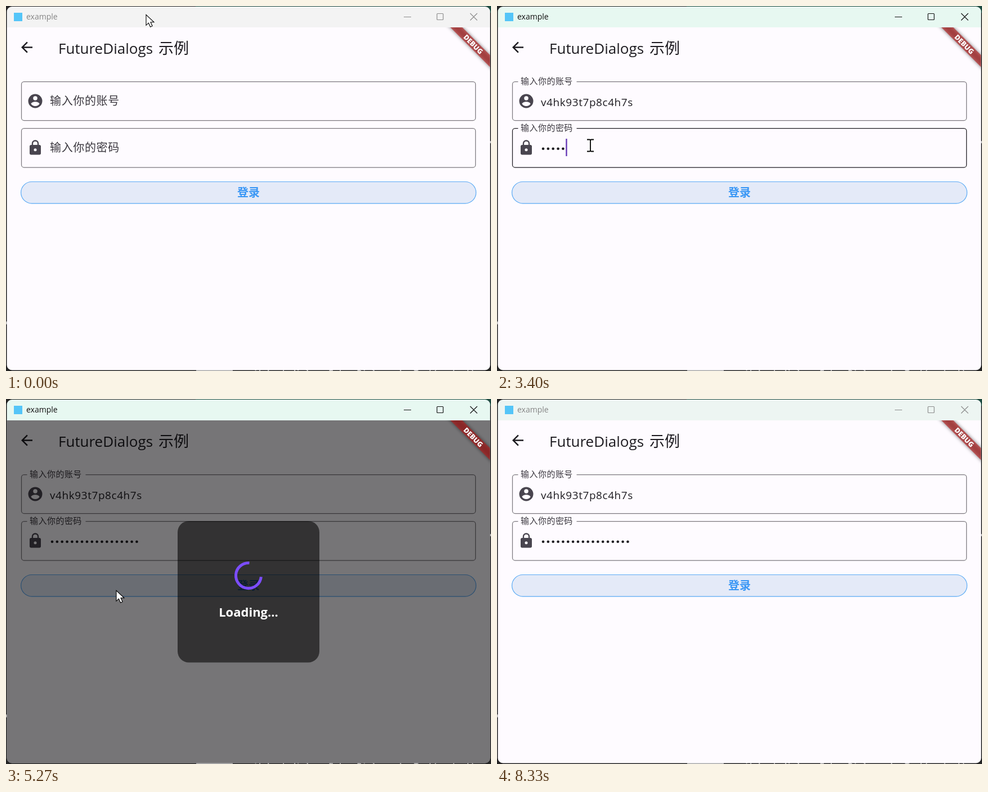
An HTML page that plays this animation: 862 by 649 pixels, repeating every 8400 ms.

```html
<!DOCTYPE html>
<html lang="zh">
<head>
<meta charset="utf-8">
<title>FutureDialogs</title>
<style>
  html, body { margin: 0; width: 100%; height: 100%; overflow: hidden; background: #242424; }
  svg { display: block; width: 862px; height: 649px; }
  text { font-family: "Open Sans", "Noto Sans", "Noto Sans CJK SC", sans-serif; }
  .cjk { font-family: "Noto Sans CJK SC", "Noto Sans CJK", sans-serif; }
  .label { font-size: 20px; font-weight: 300; letter-spacing: .63px; fill: #3b383f; }
  .box { fill: none; stroke-width: 1.25; }
  .mid { text-anchor: middle; }
</style>
</head>
<body>
<svg viewBox="0 0 862 649">
  <defs>
    <clipPath id="win"><rect x="1.5" y="1" width="859" height="646.5" rx="9"/></clipPath>
    <clipPath id="page"><path d="M1.5 38h859v600.5a9 9 0 0 1-9 9h-841a9 9 0 0 1-9-9z"/></clipPath>
    <filter id="soft" x="-20%" y="-100%" width="140%" height="300%"><feGaussianBlur stdDeviation="3"/></filter>
  </defs>

  <rect width="862" height="649" fill="#242424"/>
  <rect x="337" width="525" height="12" fill="#1d4a40"/>
  <rect x="338" y="646" width="65" height="3" fill="#a9a9a9"/>
  <rect y="561" width="3" height="5" fill="#b5b5b5"/>
  <rect x="859" y="240" width="3" height="4" fill="#b5b5b5"/>
  <text x="414" y="657" style="font:700 14px 'Noto Sans Mono',monospace" fill="#bbb">await host.dialog: FutureDialogs.showText(context);</text>

  <g clip-path="url(#win)">
    <rect id="bar" width="862" height="38"/>
    <rect x="14" y="12" width="15" height="15" fill="#54c5f8"/>
    <text id="name" x="36" y="24" font-size="14">example</text>
    <path id="controls" fill="none" stroke-width="1.2"
      d="M707 19.5h13M825 13l12.5 12.5M837.5 13L825 25.5M767 13.5h9q1 0 1 1v9q0 1-1 1h-9q-1 0-1-1v-9q0-1 1-1z"/>

    <rect y="38" width="862" height="611" fill="#fefbff"/>
    <path transform="translate(22 58.5) scale(1.25)" fill="#1d1b20"
      d="M20 11H7.83l5.59-5.59L12 4l-8 8 8 8 1.41-1.41L7.83 13H20z"/>
    <text x="93" y="84.5" font-size="26" fill="#1d1b20">FutureDialogs</text>
    <text x="271" y="85" class="cjk" font-size="27" font-weight="300" fill="#1d1b20">示例</text>

    <g id="user">
      <rect class="box" x="27.5" y="134.5" width="807" height="69" rx="4.5"/>
      <rect class="gap" x="37.5" y="132" height="5" fill="#fefbff"/>
      <text class="cjk label">输入你的账号</text>
    </g>
    <path transform="translate(37 154) scale(1.25)" fill="#49454f"
      d="M12 2a10 10 0 1 0 0 20a10 10 0 1 0 0-20zm0 3a3 3 0 1 1 0 6a3 3 0 1 1 0-6zm0 14.2c-2.5 0-4.71-1.28-6-3.22.03-1.99 4-3.08 6-3.08 1.99 0 5.97 1.09 6 3.08-1.29 1.94-3.5 3.22-6 3.22z"/>
    <text id="typed" x="78" y="177.5" font-size="18.9" letter-spacing=".63" fill="#1d1b20"></text>

    <g id="pass">
      <rect class="box" x="27.5" y="217.5" width="807" height="69.5" rx="4.5"/>
      <rect class="gap" x="37.5" y="215" height="5" fill="#fefbff"/>
      <text class="cjk label">输入你的密码</text>
    </g>
    <path transform="translate(37 237) scale(1.25)" fill="#49454f"
      d="M18 8h-1V6A5 5 0 0 0 7 6v2H6c-1.1 0-2 .9-2 2v10c0 1.1.9 2 2 2h12c1.1 0 2-.9 2-2V10c0-1.1-.9-2-2-2zm-6 9a2 2 0 1 1 0-4a2 2 0 1 1 0 4zm3.1-9H8.9V6a3.1 3.1 0 0 1 6.2 0z"/>
    <g id="dots" fill="#1d1b20"></g>
    <rect id="caret" width="2.4" height="31" fill="#673ab7"/>

    <rect id="shadow" x="27" y="315" width="808" height="39" rx="19.5" filter="url(#soft)"/>
    <rect x="26.6" y="312.5" width="808.8" height="38.6" rx="19.3" fill="#e4eaf8" stroke="#5aaaf5" stroke-width="1.2"/>
    <text x="431" y="339" class="cjk mid" font-size="20" font-weight="700" fill="#3a97f5">登录</text>

    <g id="modal">
      <rect id="barrier" y="38" width="862" height="611"/>
      <g id="loading">
        <rect x="305" y="217" width="252" height="251.5" rx="20" fill-opacity=".57"/>
        <path id="arc" fill="none" stroke="#7c4dff" stroke-width="5"/>
        <text x="431" y="387" class="mid" font-size="22" font-weight="700" fill="#fff">Loading...</text>
      </g>
      <g id="error">
        <rect x="286" y="217" width="290" height="251.5" rx="20" fill-opacity=".57"/>
        <g fill="none" stroke="#f44336" stroke-width="5.5">
          <path class="stroke" pathLength="1" stroke-dasharray="1 2" d="M411 294l40.5 40.5"/>
          <path class="stroke" pathLength="1" stroke-dasharray="1 2" d="M451.5 294L411 334.5"/>
        </g>
        <text x="431" y="401" class="cjk mid" font-size="22.5" font-weight="700" letter-spacing=".3" fill="#fff">账户名或密码错误</text>
      </g>
    </g>

    <g clip-path="url(#page)">
      <g transform="translate(860.5 38) rotate(45)">
        <rect x="-60" y="35" width="120" height="15" fill-opacity=".5" filter="url(#soft)"/>
        <rect x="-60" y="35" width="120" height="15" fill="#b71c1c" fill-opacity=".63"/>
        <text x="0" y="47" class="mid" font-size="12.4" font-weight="800" fill="#fff">DEBUG</text>
      </g>
    </g>
  </g>

  <path id="arrow" fill="#fff" stroke="#000" stroke-width="1.1" d="M.5 .5V19.3l4.4-4.1 3.2 7 3.5-1.6-3.1-6.8h6z"/>
  <g id="beam" fill="none">
    <path stroke="#fff" stroke-width="3.6" d="M-6-10.5h12M0-10.5v21M-6 10.5h12"/>
    <path stroke="#000" stroke-width="1.8" d="M-6-10.5h4.5q1.5 0 1.5 1.5 0-1.5 1.5-1.5h4.5M0-10v20M-6 10.5h4.5q1.5 0 1.5-1.5 0 1.5 1.5 1.5h4.5"/>
  </g>
</svg>

<script>
const LOOP = 8400;
const LOGIN = 'v4hk93t7p8c4h7s';
const $ = id => document.getElementById(id);
const set = (el, attrs) => { for (const k in attrs) el.setAttribute(k, attrs[k]); };
const show = (el, on) => set(el, { visibility: on ? 'visible' : 'hidden' });
const clamp = v => Math.min(1, Math.max(0, v));
const ramp = (t, a, b) => clamp((t - a) / (b - a));
const mix = (a, b, p) => a + (b - a) * p;
const smooth = p => p * p * (3 - 2 * p);
const within = (t, a, b) => t >= a && t < b;

// cubic-bezier(.4, 0, .2, 1)
function standard(x) {
  let lo = 0, hi = 1, s = 0;
  for (let i = 0; i < 18; i++) {
    s = (lo + hi) / 2;
    const bx = 3 * (1 - s) ** 2 * s * .4 + 3 * (1 - s) * s * s * .2 + s ** 3;
    if (bx < x) lo = s; else hi = s;
  }
  return 3 * (1 - s) * s * s + s ** 3;
}

// time, x, y
const PATH = [
  [0, 248.5, 15], [380, 200, 156], [800, 194.5, 166],
  [2410, 194.5, 166], [2670, 168, 245], [2870, 166, 248],
  [4210, 166, 248], [4470, 195.5, 340],
  [6210, 195.5, 340], [6690, 411, 447.5],
  [6890, 411, 447.5], [7070, 401, 453], [7940, 163, 655], [LOOP, 163, 655]
];

function pointer(t) {
  const i = Math.max(1, PATH.findIndex(k => k[0] > t));
  const [t0, x0, y0] = PATH[i - 1], [t1, x1, y1] = PATH[i];
  const p = smooth(ramp(t, t0, t1));
  return [mix(x0, x1, p), mix(y0, y1, p)];
}

function loginCount(t) {
  return t < 1400 ? 0 : Math.min(15, 1 + Math.floor((t - 1400) * 14 / 470));
}

function dotCount(t) {
  if (t < 3200) return 0;
  return Math.min(18, t < 3400 ? 1 + Math.floor((t - 3200) / 50) : 5 + Math.floor((t - 3400) / 36));
}

function field(id, top, hover, p) {
  const g = $(id);
  set(g.querySelector('.box'), { stroke: hover ? '#1d1b20' : '#7b787e' });
  set(g.querySelector('.gap'), { width: 104 * p });
  set(g.querySelector('.label'), {
    transform: `translate(${mix(78, 42, p)} ${top + mix(42, 5, p)}) scale(${mix(1, .75, p)})`
  });
}

function spin(ms) {
  const cycle = ms / 1333 % 1;
  const head = standard(clamp(cycle * 2)), tail = standard(clamp(cycle * 2 - 1));
  const turn = ms / 2222 * 2 * Math.PI + Math.floor(ms / 1333) * Math.PI / 2;
  const a = -Math.PI / 2 + tail * 1.5 * Math.PI + turn;
  const sweep = Math.max((head - tail) * 1.5 * Math.PI, .02);
  const at = v => `${431 + 22.5 * Math.cos(v)} ${314 + 22.5 * Math.sin(v)}`;
  set($('arc'), { d: `M${at(a)}A22.5 22.5 0 ${sweep > Math.PI ? 1 : 0} 1 ${at(a + sweep)}` });
}

for (let i = 0; i < 18; i++) {
  const dot = document.createElementNS('http://www.w3.org/2000/svg', 'circle');
  set(dot, { cx: 82 + 8.85 * i, cy: 253.8, r: 2.3 });
  $('dots').append(dot);
}

function render(t) {
  const [x, y] = pointer(t);
  const overUser = within(y, 134, 204), overPass = within(y, 217, 288);

  // window chrome
  const tint = ramp(t, 430, 560) - ramp(t, 8265, 8395);
  const active = within(t, 430, 8265);
  const rgb = [[243, 231], [243, 248], [243, 241]].map(([a, b]) => Math.round(mix(a, b, tint)));
  set($('bar'), { fill: `rgb(${rgb})` });
  set($('name'), { fill: active ? '#111' : '#858585' });
  set($('controls'), { stroke: active ? '#111' : '#8c8c8c' });

  // form
  field('user', 134, overUser, standard(ramp(t, 430, 597)));
  field('pass', 217, overPass, standard(ramp(t, 2690, 2857)));
  $('typed').textContent = LOGIN.slice(0, loginCount(t));
  const dots = dotCount(t);
  [...$('dots').children].forEach((dot, i) => show(dot, i < dots));

  const inUser = within(t, 430, 930) || within(t, 1400, 2330);
  const inPass = within(t, 2690, 4330);
  show($('caret'), inUser || inPass);
  set($('caret'), inPass
    ? { x: 78 + 8.85 * dots, y: 236 }
    : { x: 77.6 + $('typed').getComputedTextLength(), y: 153 });

  set($('shadow'), { opacity: .42 * (ramp(t, 4380, 4480) - ramp(t, 4760, 4960)) });

  // dialogs
  const fade = ramp(t, 4660, 4820) - ramp(t, 6735, 6885);
  const failed = t >= 5670;
  set($('barrier'), { opacity: .535 * fade });
  set($('loading'), { opacity: failed ? 0 : fade });
  set($('error'), { opacity: failed ? fade : 0 });
  spin(Math.max(0, t - 4680));
  document.querySelectorAll('.stroke').forEach((line, i) => {
    const p = ramp(t, 5670 + 160 * i, 5830 + 160 * i);
    set(line, { 'stroke-dashoffset': 1 - p });
    show(line, p > 0);
  });

  // pointer
  const beam = overUser || overPass;
  show($('beam'), beam);
  show($('arrow'), !beam);
  set(beam ? $('beam') : $('arrow'), { transform: `translate(${x} ${y})` });
}

function tick() {
  render(performance.now() % LOOP);
  requestAnimationFrame(tick);
}
tick();
</script>
</body>
</html>
```
